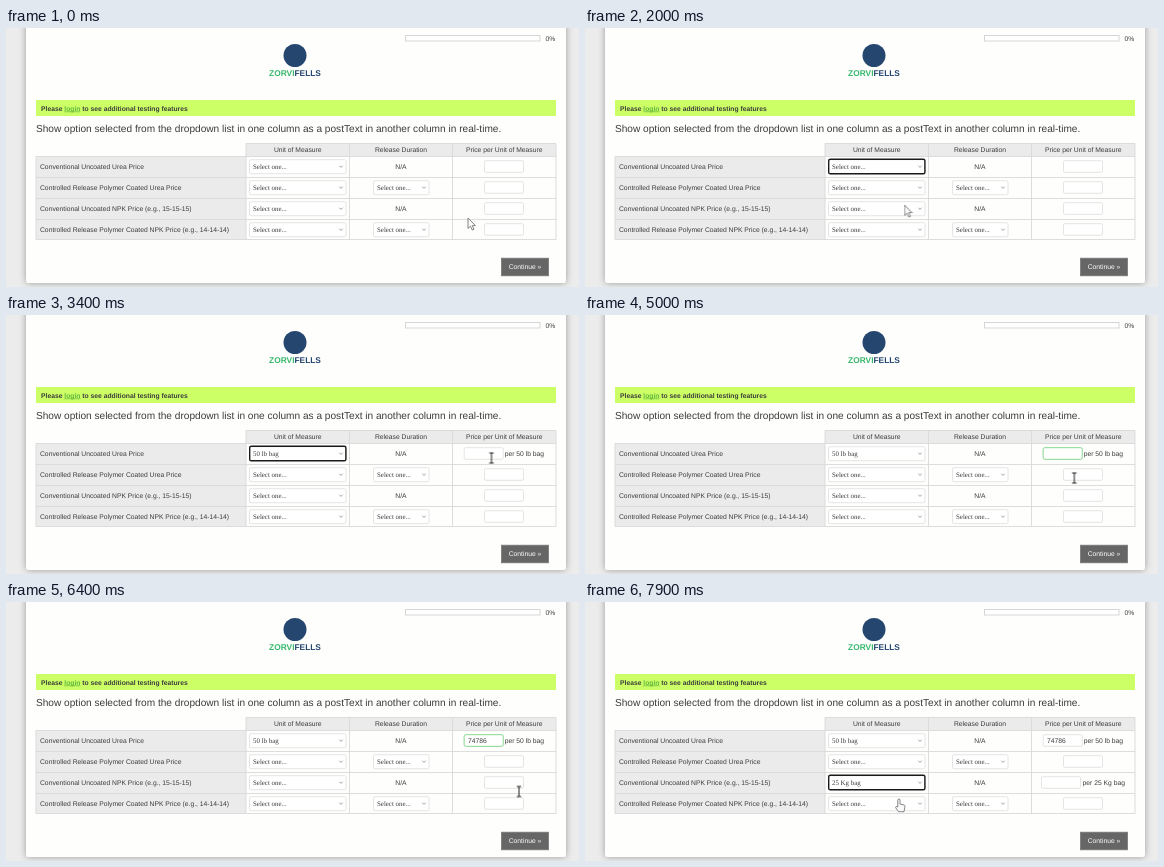
These frames come from a looping animation (573 px wide and 259 px high, 8000 ms). An HTML page:

```html
<!DOCTYPE html>
<html lang="en">
<head>
<meta charset="utf-8">
<title>Price survey</title>
<style>
html, body { margin: 0; width: 100%; height: 100%; overflow: hidden; background: #ececec; }
svg { display: block; width: 573px; height: 259px; text-rendering: geometricPrecision; }
text { font: 6.75px "Liberation Sans", Arial, sans-serif; fill: #3c3c3c; }
.serif { font: 6.9px "Liberation Serif", "Times New Roman", serif; fill: #3a3a3a; }
.bold { font-weight: bold; }
.mid { text-anchor: middle; }
.heading { font-size: 10.12px; }
.brand { font-size: 8.35px; font-weight: bold; fill: #25466f; }
.field { fill: #fff; stroke: #dedede; stroke-width: .8; }
.ring { fill: none; stroke: #1a1a1a; stroke-width: 1.4; }
.pointer { fill: #fafafa; stroke: #666; stroke-width: .8; stroke-linejoin: round; }

/* One shared 8 s clock; 1.25% is 100 ms. */
.t { animation: 8s step-end -20ms infinite; }
.ring1 { animation-name: ring1; }
.ring3 { animation-name: ring3; }
.empty1 { animation-name: empty1; }
.filled1 { animation-name: filled1; }
.empty3 { animation-name: empty3; }
.filled3 { animation-name: filled3; }
.focus { animation-name: focus; }
.typing { animation-name: typing; }
.cursor { animation-name: move; }
.arrow { animation-name: arrow; }
.hand { animation-name: hand; }
.beam { animation-name: beam; }

@keyframes ring1 { 0%, 47.5%, 100% { visibility: hidden } 20% { visibility: visible } }
@keyframes ring3 { 0% { visibility: hidden } 90%, 100% { visibility: visible } }
@keyframes empty1 { 0% { visibility: visible } 28.75%, 100% { visibility: hidden } }
@keyframes filled1 { 0% { visibility: hidden } 28.75%, 100% { visibility: visible } }
@keyframes empty3 { 0% { visibility: visible } 97.5%, 100% { visibility: hidden } }
@keyframes filled3 { 0% { visibility: hidden } 97.5%, 100% { visibility: visible } }
@keyframes focus { 0%, 83.75%, 100% { visibility: hidden } 47.5% { visibility: visible } }
@keyframes typing {
  0% { width: 0 }
  62.5% { width: 0; animation-timing-function: steps(5) }
  68.75%, 100% { width: 19px }
}
@keyframes arrow {
  0%, 22.5%, 83.75%, 90% { visibility: visible }
  7.5%, 41.25%, 87.5%, 97.5%, 100% { visibility: hidden }
}
@keyframes hand {
  0%, 22.5%, 90% { visibility: hidden }
  7.5%, 87.5%, 97.5%, 100% { visibility: visible }
}
@keyframes beam { 0%, 83.75%, 100% { visibility: hidden } 41.25% { visibility: visible } }
@keyframes move {
  0% { transform: translate(462px, 190px); animation-timing-function: steps(6) }
  7.5%, 21.25% { transform: translate(330px, 141px); animation-timing-function: steps(3) }
  25% { transform: translate(319.5px, 177px); animation-timing-function: steps(4) }
  30%, 31.25% { transform: translate(308px, 168px); animation-timing-function: steps(9) }
  42.5%, 47.5% { transform: translate(485.5px, 143px); animation-timing-function: steps(8) }
  57.5%, 71.25% { transform: translate(489.3px, 163px); animation-timing-function: steps(4) }
  76.25% { transform: translate(510px, 206px); animation-timing-function: steps(3) }
  80% { transform: translate(513px, 189.5px); animation-timing-function: steps(2) }
  82.5% { transform: translate(508px, 184px); animation-timing-function: steps(4) }
  87.5%, 88.75% { transform: translate(331px, 178px); animation-timing-function: steps(5) }
  95%, 96.25% { transform: translate(310px, 210px); animation-timing-function: steps(2) }
  98.75%, 100% { transform: translate(314px, 197px) }
}
</style>
</head>
<body>
<svg viewBox="0 0 573 259">
  <defs>
    <filter id="shadow" x="-5%" y="-5%" width="110%" height="112%">
      <feDropShadow dx="0" dy="0" stdDeviation="3.5" flood-opacity=".35"/>
    </filter>
    <path id="chevron" d="M-1.7 -.8 0 .9 1.7 -.8" fill="none" stroke="#777" stroke-width=".7"/>
    <g id="unit">
      <rect class="field" x="243.5" y="131.7" width="96.5" height="14" rx="1.5"/>
      <use href="#chevron" x="335" y="138.5"/>
    </g>
    <g id="duration">
      <rect class="field" x="367.5" y="131.7" width="55.5" height="14" rx="1.5"/>
      <use href="#chevron" x="418" y="138.5"/>
      <text class="serif" x="371" y="140.6">Select one...</text>
    </g>
    <text id="prompt" class="serif" x="247" y="140.6">Select one...</text>
    <text id="none" class="mid" x="395" y="140.9">N/A</text>
    <rect id="price" class="field" x="478.5" y="132.7" width="39" height="11.6" rx="1.5"/>
    <rect id="ring" class="ring" x="243.7" y="131.2" width="96.2" height="14.6" rx="1.6"/>
    <clipPath id="typed"><rect class="t typing" x="462" y="130" width="0" height="16"/></clipPath>
  </defs>

  <rect width="573" height="259" fill="#ececec"/>
  <rect x="20" y="-8" width="540" height="263" rx="3" fill="#fefefd" filter="url(#shadow)"/>

  <rect x="399.5" y="7.5" width="134.5" height="5.5" fill="#fff" stroke="#d2d2d2" stroke-width=".9"/>
  <text x="539.5" y="12.6">0%</text>

  <circle cx="289" cy="27.5" r="11.5" fill="#25466f"/>
  <text class="brand mid" x="289" y="48"><tspan fill="#35b86b">ZORVI</tspan>FELLS</text>

  <rect x="30" y="72" width="520" height="16" fill="#cf6"/>
  <text class="bold" x="35" y="82.5">Please <tspan fill="#62b63c" text-decoration="underline">login</tspan> to see additional testing features</text>
  <text class="heading" x="30" y="104.2">Show option selected from the dropdown list in one column as a postText in another column in real-time.</text>

  <path d="M240 115.5H550V128.5H240ZM30 128.5H240V211.5H30Z" fill="#ebebeb"/>
  <path d="M240 115.5H550V211.5H30V128.5H550M240 115.5V211.5M343.5 115.5V211.5M446.5 115.5V211.5M30 149.5H550M30 170.5H550M30 191.5H550" fill="none" stroke="#dadada" stroke-width=".9"/>
  <g class="mid">
    <text x="291.8" y="124.3">Unit of Measure</text>
    <text x="395" y="124.3">Release Duration</text>
    <text x="498.2" y="124.3">Price per Unit of Measure</text>
  </g>

  <g>
    <text x="34" y="140.9">Conventional Uncoated Urea Price</text>
    <use href="#unit"/>
    <use href="#none"/>
    <g class="t empty1"><use href="#prompt"/><use href="#price"/></g>
    <g class="t filled1">
      <text class="serif" x="247" y="140.6">50 lb bag</text>
      <use href="#price" x="-20.3"/>
      <text x="498.7" y="140.9">per 50 lb bag</text>
    </g>
    <rect class="t focus" x="458.2" y="132.7" width="39" height="11.6" rx="1.5" fill="#fff" stroke="#7fd98a" stroke-width=".9"/>
    <text x="462" y="140.9" clip-path="url(#typed)">74786</text>
    <use class="t ring1" href="#ring"/>
  </g>

  <g transform="translate(0 21)">
    <text x="34" y="140.9">Controlled Release Polymer Coated Urea Price</text>
    <use href="#unit"/><use href="#prompt"/><use href="#duration"/><use href="#price"/>
  </g>

  <g transform="translate(0 42)">
    <text x="34" y="140.9">Conventional Uncoated NPK Price (e.g., 15-15-15)</text>
    <use href="#unit"/>
    <use href="#none"/>
    <g class="t empty3"><use href="#prompt"/><use href="#price"/></g>
    <g class="t filled3">
      <text class="serif" x="247" y="140.6">25 Kg bag</text>
      <use href="#price" x="-22"/>
      <text x="497.5" y="140.9">per 25 Kg bag</text>
    </g>
    <use class="t ring3" href="#ring"/>
  </g>

  <g transform="translate(0 63)">
    <text x="34" y="140.9">Controlled Release Polymer Coated NPK Price (e.g., 14-14-14)</text>
    <use href="#unit"/><use href="#prompt"/><use href="#duration"/><use href="#price"/>
  </g>

  <rect x="495.5" y="230.2" width="47" height="17.6" fill="#666" stroke="#777" stroke-width=".8"/>
  <text class="mid" x="519" y="241.4" style="fill:#fff">Continue »</text>

  <g class="t cursor">
    <path class="pointer t arrow" d="M0 0V10.5L2.5 8.2 4.3 12.1 6 11.3 4.3 7.6H7.4Z"/>
    <path class="pointer t hand" d="M-1.2 1.2Q-1.2 0 -.1 0 1 0 1 1.2V5L5 6Q6.1 6.3 6 7.6L5 12.7H-.4L-3.6 8.4Q-3.3 6.8 -1.2 8Z"/>
    <path class="t beam" d="M-2.2 -5H2.2M-2.2 5H2.2M0 -5V5" fill="none" stroke="#222"/>
  </g>
</svg>
</body>
</html>
```
